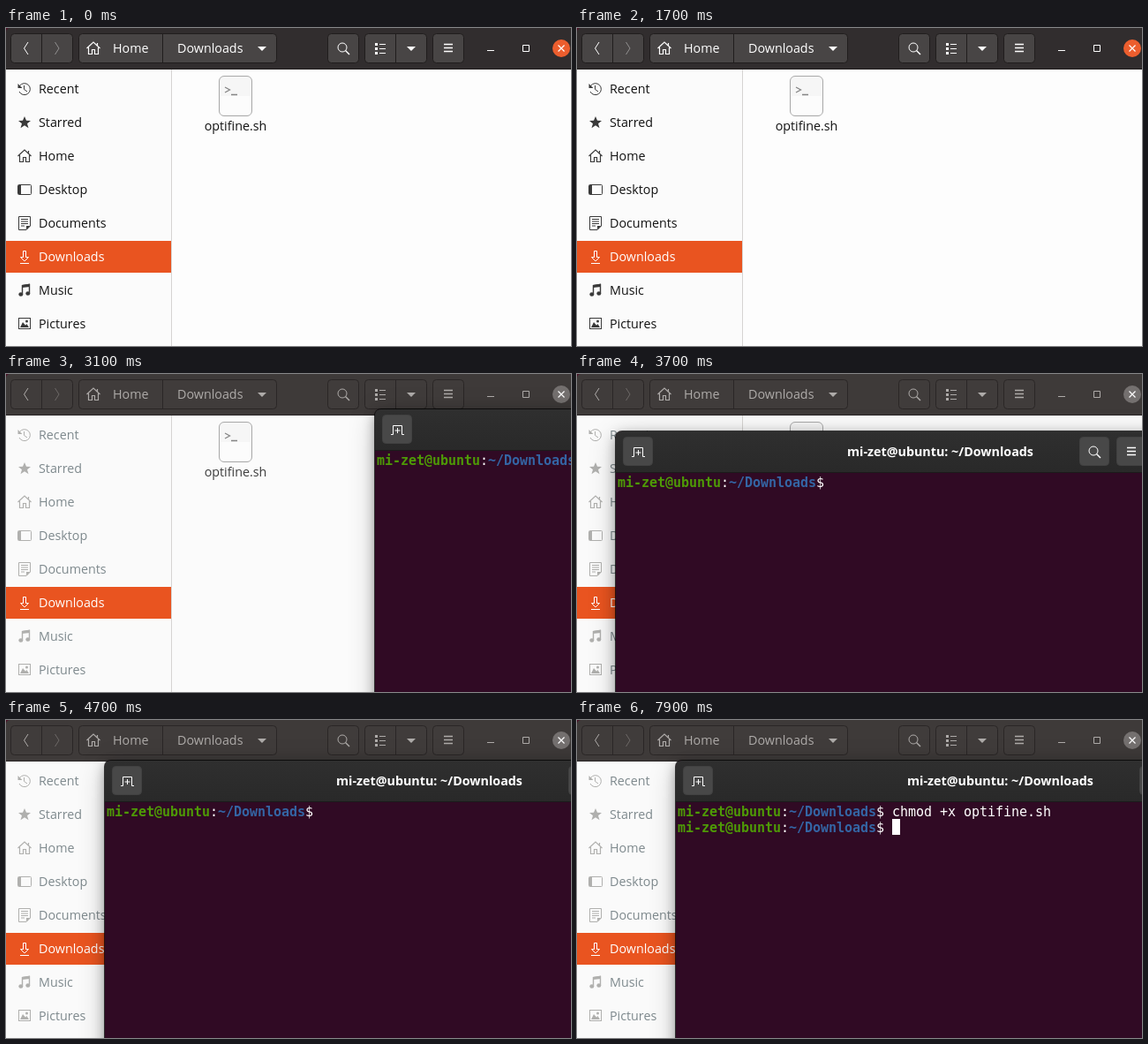
Recreate the animation shown at these times as an HTML page. Size 640 by 360 pixels, loop 8000 ms.

```html
<!DOCTYPE html>
<html lang="en">
<head>
<meta charset="utf-8">
<title>Make a script executable</title>
<style>
html, body { margin: 0; width: 100%; height: 100%; overflow: hidden; }
#stage { position: relative; width: 640px; height: 360px; overflow: hidden; font: 14.3px "Open Sans", "Noto Sans", sans-serif; font-variant-ligatures: none; }
#stage > svg { position: absolute; inset: 0; }
svg { display: block; }
.line { fill: none; stroke: currentColor; }
.solid { fill: currentColor; }
.bar { fill: var(--bar); }
.btn { fill: var(--btn); stroke: var(--edge); }
.bar-ink { color: var(--barInk); fill: var(--barInk); }
.sep { stroke: var(--edge); }
.side-text { fill: var(--sideInk); }
.side-icon { color: var(--icon); }
.picked .side-text { fill: #fff; }
.picked .side-icon { color: #fff; }
.menu text { fill: #3a3a3a; }
.menu .dim { fill: #959595; }
#term { position: absolute; left: 0; top: 0; width: 735px; height: 490px; border-radius: 7px 7px 0 0; background: #300a24; box-shadow: 0 0 0 1px rgba(0,0,0,.75), 0 4px 14px rgba(0,0,0,.35), 0 6px 32px rgba(0,0,0,.2); }
#term svg { position: absolute; left: 0; top: 0; }
#term pre { position: absolute; left: 2px; top: 48px; margin: 0; color: #fff; font: 15px/18px "DejaVu Sans Mono", monospace; letter-spacing: -.03px; }
#before, #typed { position: relative; top: 1px; }
#term .user { color: #4e9a06; }
#term .path { color: #3465a4; }
#cursor { display: inline-block; width: 9px; height: 18px; vertical-align: top; background: #fff; }
</style>
</head>
<body>
<div id="stage">
  <svg width="640" height="360">
    <rect width="640" height="360" fill="var(--page)"/>
    <rect y="47" width="187" height="313" fill="var(--side)"/>
    <path d="M187.5 47V360" stroke="#d6d4d2"/>
    <rect class="bar" width="640" height="47"/>
    <path d="M0 0H5Q0 0 0 5Z" fill="#4a1228"/>
    <path d="M0 46.5H640" stroke="var(--edge)"/>

    <g class="btn">
      <rect x="5.5" y="6.5" width="70" height="33" rx="4"/>
      <rect x="82.5" y="6.5" width="224" height="33" rx="4"/>
      <rect x="364.5" y="6.5" width="35" height="33" rx="4"/>
      <rect x="406.5" y="6.5" width="70" height="33" rx="4"/>
      <rect x="483.5" y="6.5" width="35" height="33" rx="4"/>
    </g>
    <path class="sep" d="M40.5 7V39M177.5 7V39M441.5 7V39"/>
    <g class="bar-ink">
      <path class="line" d="M25 16L20.5 23L25 30"/>
      <path class="line" d="M55.5 16L60 23L55.5 30" opacity=".4"/>
      <use href="#home" x="99" y="23"/>
      <text x="121" y="28">Home</text>
      <text x="194" y="28">Downloads</text>
      <path d="M285 21H295L290 26Z"/>
      <use href="#lens" x="382" y="23"/>
      <path d="M418 17h3v3h-3zM418 22h3v3h-3zM418 27h3v3h-3zM423 18h7v1h-7zM423 23h7v1h-7zM423 28h7v1h-7z"/>
      <path d="M454 21H464L459 26Z"/>
      <use href="#bars" x="501" y="23"/>
      <path class="line" d="M545 25.5H553M585.5 19.5H592.5V26.5H585.5Z"/>
    </g>
    <circle cx="629" cy="23" r="10" fill="var(--close)"/>
    <path d="M625.5 19.5L632.5 26.5M632.5 19.5L625.5 26.5" stroke="#fff" stroke-width="1.2"/>

    <g id="places"></g>

    <rect x="241.5" y="54.5" width="37" height="45" rx="5.5" fill="#f6f6f6" stroke="#a9a9a9"/>
    <path d="M243 77H277V96Q277 98 275 98H245Q243 98 243 96Z" fill="#fcfcfc"/>
    <path class="line" d="M248 67L253.5 70L248 73M255 75.5H262" color="#858585" stroke-width="1.3"/>
    <text x="260" y="116" text-anchor="middle" fill="var(--fileInk)">optifine.sh</text>

    <g id="menu" class="menu">
      <rect x="406" y="200" width="260" height="138" rx="6" fill="#000" opacity=".12"/>
      <rect x="405.5" y="198.5" width="260" height="138" rx="6" fill="#fbfbfb" stroke="#9c9c9c"/>
      <rect id="hover" x="406" width="234" height="26" fill="#dcdcdc"/>
      <path d="M406 228.5H640M406 281.5H640M406 307.5H640" stroke="#dedede"/>
      <text x="437" y="221">New Folder</text>
      <text class="dim" x="574" y="221">Shift+Ctrl+N</text>
      <text class="dim" x="437" y="247">Paste</text>
      <text x="437" y="273">Select All</text>
      <text class="dim" x="615" y="273">Ctrl+A</text>
      <text x="437" y="299">Properties</text>
      <text x="437" y="325">Open in Terminal</text>
    </g>

    <defs>
      <g id="lens" class="line"><circle cx="-1" cy="-1" r="5"/><path d="M2.5 2.5L7 7" stroke-width="1.4"/></g>
      <path id="bars" class="line" d="M-5 -4.5H5M-5 -.5H5M-5 3.5H5" stroke-width="1.3"/>
      <path id="home" class="line" d="M-7.5 0L0 -7L7.5 0M-5.5 -1V6.5H-1.5V1.5H1.5V6.5H5.5V-1M4.5 -6V-3.5" stroke-width="1.2"/>
      <g id="recent" class="line"><path d="M-5.5 -3.5A6.5 6.5 0 1 1 -6 3M-.5 -4V.5L3 3"/><path class="solid" stroke="none" d="M-7.5 -6V-1H-2.5Z"/></g>
      <path id="starred" class="solid" d="M0 -7L2 -2.2L7 -2L3 1.2L4.5 6.2L0 3.3L-4.5 6.2L-3 1.2L-7 -2L-2 -2.2Z"/>
      <g id="desktop"><rect class="line" x="-7.5" y="-5.5" width="15" height="11" rx="1"/><path class="solid" d="M-7 -5H-4V5H-7Z"/></g>
      <g id="documents"><path class="line" d="M-6.5 -7.5H6.5V3L2 7.5H-6.5ZM-4 -4.5H4M-4 -2H4M-4 .5H4M-4 3H0"/><path class="solid" d="M2 7.5V3H6.5Z"/></g>
      <path id="downloads" class="line" d="M-1.5 -6.5H1.5V.5H4.5L0 5L-4.5 .5H-1.5ZM-5 7.5H5"/>
      <g id="music"><path class="line" d="M-2.5 4V-5.5L5.5 -6.5V3" stroke-width="1.4"/><path class="solid" d="M-3 -6L6 -7.5V-4L-3 -3Z"/><ellipse class="solid" cx="-4.2" cy="4.5" rx="2.5" ry="2.2"/><ellipse class="solid" cx="3.8" cy="3.5" rx="2.5" ry="2.2"/></g>
      <g id="pictures"><rect class="line" x="-6.5" y="-6.5" width="13" height="12"/><path class="solid" d="M-5 4L-2 -2L1 1.5L2.5 0L5 4Z"/><circle class="solid" cx="2.5" cy="-3" r="1.5"/></g>
      <linearGradient id="termBar" x2="0" y2="1"><stop stop-color="#2f2f2f"/><stop offset="1" stop-color="#292929"/></linearGradient>
    </defs>
  </svg>

  <div id="term">
    <svg width="735" height="48" color="#fff">
      <path d="M0 47V7Q0 0 7 0H728Q735 0 735 7V47Z" fill="url(#termBar)"/>
      <path d="M0 46.5H735" stroke="#1b1b1b"/>
      <g fill="#484848" stroke="#424242">
        <rect x="8.5" y="6.5" width="33" height="32" rx="4"/>
        <rect x="525.5" y="6.5" width="33" height="32" rx="4"/>
        <rect x="567.5" y="6.5" width="33" height="32" rx="4"/>
      </g>
      <path class="line" d="M18 28.5H20.5V18.5H30.5V28.5H33M25.5 21V27M22.5 24H28.5"/>
      <use href="#lens" x="542" y="23"/>
      <use href="#bars" x="584" y="23"/>
      <text x="367.5" y="28" text-anchor="middle" font-weight="700" fill="#fff">mi-zet@ubuntu: ~/Downloads</text>
    </svg>
    <pre><span id="before"></span><span id="typed"></span><span id="cursor"></span></pre>
  </div>
</div>

<script>
const LOOP = 8000;
const el = id => document.getElementById(id);
const stage = el('stage'), term = el('term');

const places = ['Recent', 'Starred', 'Home', 'Desktop', 'Documents', 'Downloads', 'Music', 'Pictures'];
el('places').innerHTML = places.map((name, i) => {
  const y = 69 + 38 * i, picked = name === 'Downloads';
  return `<g${picked ? ' class="picked"' : ''}>
    ${picked ? `<rect y="${y - 18}" width="187" height="36" fill="#e95420"/>` : ''}
    <use class="side-icon" href="#${name.toLowerCase()}" x="21" y="${y}"/>
    <text class="side-text" x="37" y="${y + 5}">${name}</text></g>`;
}).join('');

const prompt = '<b class="user">mi-zet@ubuntu</b>:<b class="path">~/Downloads</b>$ ';
const command = 'chmod +x optifine.sh ';

// Colours of the file window: focused, unfocused
const theme = {
  bar: [[49, 45, 46], [62, 58, 57]],
  btn: [[72, 69, 69], [64, 60, 59]],
  edge: [[32, 29, 29], [42, 38, 38]],
  barInk: [[255, 255, 255], [174, 171, 169]],
  close: [[236, 94, 46], [116, 112, 111]],
  page: [[253, 253, 253], [251, 251, 251]],
  side: [[251, 251, 251], [250, 250, 250]],
  sideInk: [[18, 18, 18], [126, 137, 141]],
  icon: [[58, 58, 58], [176, 176, 174]],
  fileInk: [[18, 18, 18], [60, 60, 60]]
};

// Step tables: [start, values...]
const blur = [[0, 0], [2000, .35], [2100, .75], [2200, 1]];
const hover = [[0, -1], [1200, 255], [1300, 281], [1400, 307]];
const windowAt = [
  [0, 0, 0, 0, 1], [2900, 418, 40, .35, .94], [3000, 418, 40, 1, 1],
  [3600, 230, 53, 1, 1], [3700, 44, 65, 1, 1],
  [4000, 66, 59, 1, 1], [4100, 98, 50, 1, 1], [4200, 112, 46, 1, 1]
];
const typedCount = [
  [0, 0], [5000, 2], [5300, 3], [5400, 5], [5600, 6], [5900, 7], [6200, 8], [6600, 9],
  [6800, 8], [6900, 7], [7000, 8], [7100, 9], [7500, 10], [7600, 21], [7900, 0]
];

const at = (steps, t) => steps.findLast(s => s[0] <= t).slice(1);
const mix = ([a, b], k) => `rgb(${a.map((v, i) => Math.round(v + (b[i] - v) * k))})`;

function draw(t) {
  const [k] = at(blur, t);
  for (const name in theme) stage.style.setProperty('--' + name, mix(theme[name], k));

  const [row] = at(hover, t);
  el('menu').style.display = t >= 900 && t < 1700 ? '' : 'none';
  el('hover').style.display = row < 0 ? 'none' : '';
  el('hover').setAttribute('y', row);

  const [x, y, alpha, scale] = at(windowAt, t);
  term.style.display = alpha ? '' : 'none';
  term.style.opacity = alpha;
  term.style.transform = `translate(${x}px, ${y}px) scale(${scale})`;

  const [count] = at(typedCount, t);
  const before = t < 3100 ? '' : t < 7900 ? prompt : prompt + command + '\n' + prompt;
  if (draw.before !== before) el('before').innerHTML = draw.before = before;
  el('typed').textContent = command.slice(0, count);
  el('cursor').style.visibility = t >= 5000 || (t >= 4100 && t < 4700) ? '' : 'hidden';
}

const start = performance.now();
function tick() {
  draw((performance.now() - start) % LOOP);
  requestAnimationFrame(tick);
}
tick();
</script>
</body>
</html>
```
